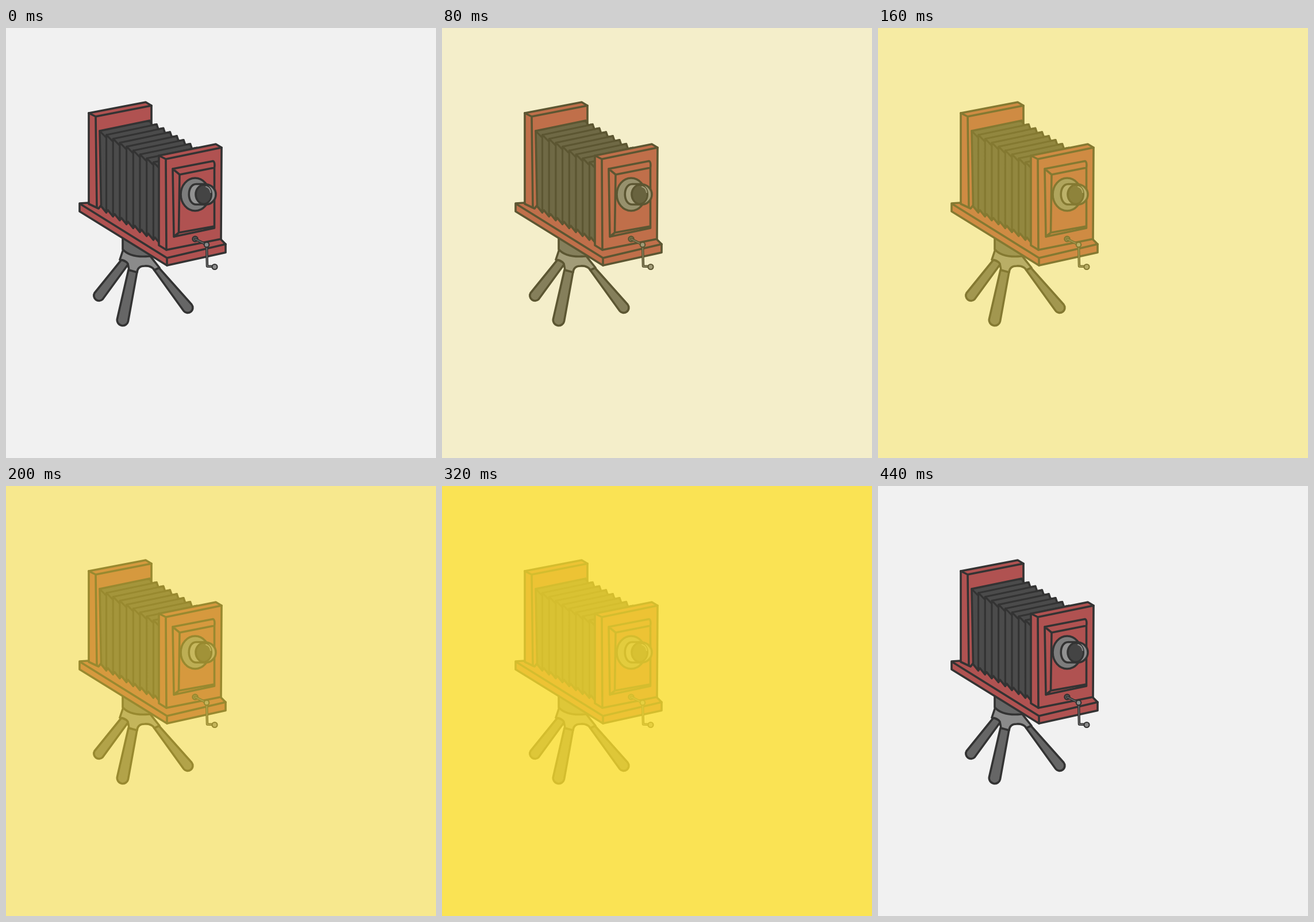
These frames come from a looping animation (748 by 748 pixels, 0.48 s). An HTML page:

```html
<!DOCTYPE html>
<html>
<head>
<meta charset="utf-8">
<title>Folding camera</title>
<style>
  html, body { margin: 0; width: 100%; height: 100%; overflow: hidden; background: #f1f1f1; }
  svg { display: block; width: 100%; height: 100%; }
  .ink { stroke: #333; stroke-width: 3.6; stroke-linejoin: round; stroke-linecap: round; fill: none; }
  .ink .red { fill: #b05251; }
  .ink .dark { fill: #4b4b4b; }
  .ink .mid { fill: #666; }
  .ink .light { fill: #8b8b8b; }
</style>
</head>
<body>
<svg viewBox="0 0 748 748">
  <g class="ink">
    <g id="tripod">
      <path class="mid" d="M201 403L154 461A9 9 0 0 0 168 472L214 409Z"/>
      <path class="mid" d="M257 420L309 492A8.7 8.7 0 0 0 323 481L265 416Z"/>
      <path class="mid" d="M213 421L193.500 506A9.700 9.700 0 0 0 212.500 510L228 424Z"/>
      <path class="light" d="M204 385L198 403Q207 403 212 410L214 421L228 425Q229 414 241 414Q253 413 258 421L267 417L251 397Z"/>
      <path class="mid" d="M203 364V385Q216 400 249 397L262 390Z"/>
    </g>
    <g id="base">
      <path class="red" d="M128 305L144 304L360 350L374 368L382 376V390.500L280 413L128 319Z"/>
      <path d="M129 306L280 400L382 376M280 400V413"/>
    </g>
    <g id="back">
      <path class="red" d="M144 148L243 129L253 135V200L161 314L144 306Z"/>
      <path d="M144 148L156 154L253 135M156 154L158 312"/>
    </g>
    <path id="bellows" class="dark"/>
    <path id="folds" stroke-width="3.2"/>
    <g id="front">
      <path class="red" d="M266 222L365 202L375 208L374 367L279 386L266 378Z"/>
      <path d="M266 222L278 228L375 208M278 228L279 386"/>
      <path d="M290 245L360 231.500Q364 233 362.500 243V348L292 363ZL302 255L362.500 243M302 255L300.500 356L362 345M300.500 356L292 363"/>
    </g>
    <g id="lens">
      <ellipse fill="#7d7d7d" cx="329" cy="289.500" rx="25" ry="28.500"/>
      <path fill="#929292" d="M347 271.500H331C314 271.500 314 307 331 307H347Z"/>
      <circle class="light" cx="347.500" cy="289.500" r="17.500"/>
      <ellipse fill="#444" stroke-width="3" cx="344" cy="289.500" rx="13.500" ry="16.500"/>
      <path d="M348 276Q355 278 356 286" stroke="#8b8b8b" stroke-width="2"/>
    </g>
    <g id="crank">
      <circle class="mid" cx="329" cy="367" r="4.500" stroke-width="2.500"/>
      <path id="rod" d="M329 367L349 377L350 414.500L363 415" stroke-width="4.500"/>
      <path d="M329 367L349 377L350 414.500L363 415" style="stroke:#777;stroke-width:1.300"/>
      <g class="light" style="stroke-width:2.200">
        <circle cx="349" cy="377" r="4.300"/>
        <circle cx="363" cy="415.500" r="4.500"/>
      </g>
    </g>
  </g>
  <rect id="veil" width="748" height="748" fill="#fde02d" opacity="0"/>
</svg>
<script>
  const STEP = 40, STEPS = 12, PITCH = 11.7, FOLDS = 9;
  const byId = id => document.getElementById(id);

  // Pleats: a saw edge on the upper right, another along the bottom left.
  let topEdge = "M163 179L250 161L254 169", bottomEdge = "", lines = "";
  for (let i = 0; i < FOLDS; i++) {
    const dx = i * PITCH, dy = i * 6.8;
    const x = 174.500 + dx, tip = 321 + dy, ridge = 186 + dy;
    topEdge += `L${262 + dx} ${167.500 + dy}L${265 + dx} ${176 + dy}`;
    bottomEdge = `L${x} ${tip}L${x - 9} ${tip - 11}` + bottomEdge;
    lines += `M${262 + dx} ${167.500 + dy}L${x} ${ridge}V${tip}`;
    lines += `M${x - 11.5} ${ridge - 7}L${x} ${ridge + 5}`;
  }
  byId("bellows").setAttribute("d", topEdge + "L266 374" + bottomEdge + "Z");
  byId("folds").setAttribute("d", lines);

  // The veil thickens by a tenth per step, then clears at once.
  const veil = byId("veil");
  function draw(now) {
    const step = Math.floor(now / STEP) % STEPS;
    veil.setAttribute("opacity", step > 10 ? 0 : step / 10);
    requestAnimationFrame(draw);
  }
  requestAnimationFrame(draw);
</script>
</body>
</html>
```
